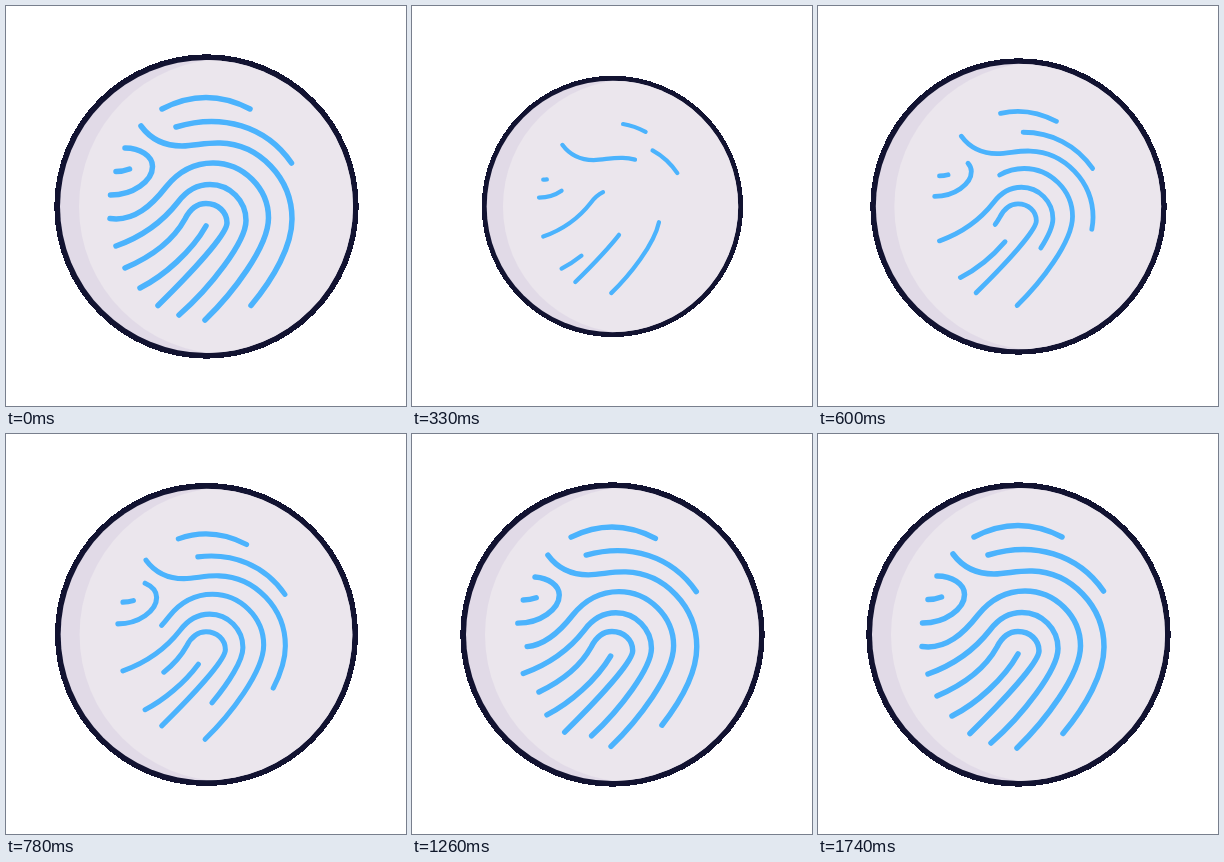
An HTML page that plays this animation: 400x400 px, repeating every 3.8 s.

```html
<!DOCTYPE html>
<html lang="en">
<head>
<meta charset="utf-8">
<title>Fingerprint</title>
<style>
  html, body { margin: 0; width: 100%; height: 100%; overflow: hidden; background: #fff; }
  svg { display: block; width: 100%; height: 100%; }
  #ridges { fill: none; stroke: #4bb3fd; stroke-width: 5.5; stroke-linecap: round; stroke-linejoin: round; }
</style>
</head>
<body>
<svg viewBox="0 0 400 400">
  <clipPath id="face"><circle cx="200.5" cy="200.5" r="146.5"/></clipPath>
  <g id="badge">
    <circle cx="200.5" cy="200.5" r="152.2" fill="#121331" shape-rendering="crispEdges"/>
    <circle cx="200.5" cy="200.5" r="146.5" fill="#e1dae7"/>
    <circle cx="220.5" cy="200.5" r="147.5" fill="#ebe6ed" clip-path="url(#face)"/>
  </g>
  <g id="ridges"></g>
</svg>
<script>
const LOOP = 3800, END = 1740, STEP = 30, SQUEEZED = 270, BADGE_END = 930;
const badge = document.getElementById('badge');
const ridges = document.getElementById('ridges');

// Each ridge slides out towards its end (-1) or its start (1) and returns from the other side.
const paths = [
  [1, 'M156 103Q200 80 244 103'],
  [1, 'M170 121C216 107 260 120 285.5 157'],
  [-1, 'M135 120C146 135 160 140 176 140C190 139.5 200 136.5 214 137C253 138 286 172 286 213C286 240 268 272 245 299.5'],
  [1, 'M119 142C134 142 146.5 150 146.5 160.5C146.5 175 127 189 104.5 189'],
  [-1, 'M110 165.5Q117 165.5 123.5 163'],
  [1, 'M104 212.5C128 216 146 199 160 181C172 166 188 157 207 157C237 157 262.5 182 262.5 212C262.5 241 226 288 199 314'],
  [-1, 'M110 240C138 230 158 214 172 196C181 184 191 178.5 204 178.5C224 178.5 240 195 240 214.5C240 236 204 282 173 309'],
  [1, 'M119 262C147 250 168 233 179 213C184 203 190 197.5 200 197.5C212 197.5 221 206 221 217C221 228 186 266 152 299.5'],
  [-1, 'M134 282C158 270 186 245 200 220']
].map(([direction, d]) => {
  const node = document.createElementNS('http://www.w3.org/2000/svg', 'path');
  node.setAttribute('d', d);
  node.setAttribute('pathLength', 1);
  node.setAttribute('stroke-dasharray', '1 1');
  ridges.append(node);
  return { node, direction };
});

function bezier(x1, y1, x2, y2) {
  const at = (u, a, b) => 3 * (1 - u) * (1 - u) * u * a + 3 * (1 - u) * u * u * b + u * u * u;
  return x => {
    if (x <= 0) return 0;
    if (x >= 1) return 1;
    let low = 0, high = 1;
    for (let i = 0; i < 30; i++) {
      const mid = (low + high) / 2;
      if (at(mid, x1, x2) < x) low = mid; else high = mid;
    }
    return at(low, y1, y2);
  };
}

const shrink = bezier(.167, .167, .667, 1);
const grow = bezier(.167, .167, .2, 1);
const slide = bezier(.21, .53, 0, 1);

function squeeze(t, depth, end) {
  const amount = t < SQUEEZED
    ? shrink(t / SQUEEZED)
    : 1 - grow((t - SQUEEZED) / (end - SQUEEZED));
  return 1 - depth * amount;
}

function setScale(node, scale) {
  node.setAttribute('transform', `translate(200 200) scale(${scale}) translate(-200 -200)`);
}

function draw(time) {
  const t = Math.min(Math.floor(time / STEP) * STEP, END);
  setScale(badge, squeeze(t, .17, BADGE_END));
  setScale(ridges, squeeze(t, .25, END));
  const shift = 2 * slide(t / END) % 2;
  for (const { node, direction } of paths) {
    node.setAttribute('stroke-dashoffset', direction * shift);
  }
}

const start = performance.now();
function tick() {
  draw((performance.now() - start) % LOOP);
  requestAnimationFrame(tick);
}
tick();
</script>
</body>
</html>
```
